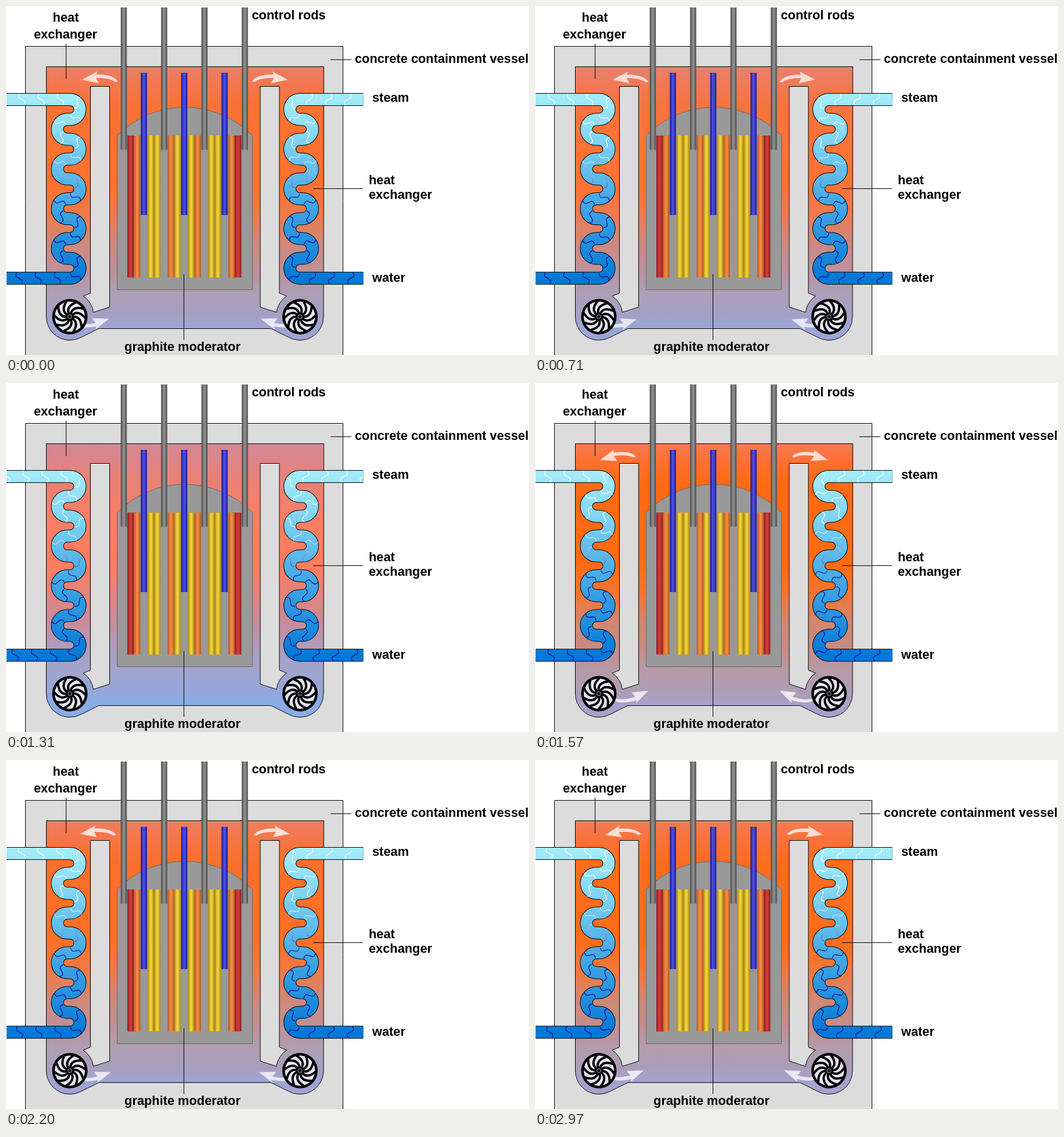
An HTML page with a canvas for the animation above (3000 ms loop, 901 by 601 pixels).

```html
<!DOCTYPE html>
<html lang="en">
<head>
<meta charset="utf-8">
<title>Reactor diagram</title>
<style>
html, body { margin: 0; width: 100%; height: 100%; overflow: hidden; background: #fff; }
canvas { display: block; }
</style>
</head>
<body>
<canvas id="stage" width="901" height="601"></canvas>
<script>
const c = document.getElementById('stage').getContext('2d');
const LOOP = 3000, CYCLE = 727, MIRROR = 616.5;
const CONCRETE = '#dcdcdc';

// Coolant colours as [y, cool, hot]
const COOLANT = [
  [105, 0xcf8b9a, 0xf57a52], [135, 0xda8794, 0xff7030], [175, 0xe88480, 0xff6a12],
  [250, 0xff806c, 0xff6a12], [310, 0xff7f68, 0xff6a12], [360, 0xe28585, 0xf47530],
  [410, 0xc88ca0, 0xd2866c], [460, 0xa89fc8, 0xc68c88], [495, 0x9da6d2, 0xb59ba8],
  [530, 0x92a9de, 0xae9cb4], [552, 0x86aee9, 0xa9a1cb], [576, 0x86aee9, 0xa9a1cb]
];

function mix(a, b, k) {
  const part = n => Math.round((a >> n & 255) * (1 - k) + (b >> n & 255) * k);
  return `rgb(${part(16)},${part(8)},${part(0)})`;
}

function gradient(x0, y0, x1, y1, stops) {
  const g = c.createLinearGradient(x0, y0, x1, y1);
  stops.forEach(([p, color]) => g.addColorStop(p, color));
  return g;
}

function paint(path, fill, line = '#000') {
  c.fillStyle = fill;
  c.fill(path);
  c.strokeStyle = line;
  c.lineWidth = 1;
  c.stroke(path);
}

function place(x, y, angle, draw) {
  c.save();
  c.translate(x, y);
  c.rotate(angle);
  draw();
  c.restore();
}

// Pipe coil
const ROW = 34.2, BEND = ROW / 2, TOP = 161, RIGHT = 110.4, LEFT = 105.6;
const ARC = Math.PI * BEND, SEGMENT = ARC + RIGHT - LEFT;
const coil = new Path2D();
coil.moveTo(1, TOP);
for (let i = 0; i < 9; i++) {
  const y = TOP + BEND + i * ROW;
  if (i % 2) coil.arc(LEFT, y, BEND, -Math.PI / 2, Math.PI / 2, true);
  else coil.arc(RIGHT, y, BEND, -Math.PI / 2, Math.PI / 2);
}
coil.lineTo(1, TOP + 9 * ROW);
const pipeFill = gradient(0, 155, 0, 470, [[0, '#a3ecfa'], [.2, '#87d9f4'], [.5, '#52b2e8'], [1, '#0478d6']]);
const waveInk = gradient(0, 150, 0, 470, [[0, '#fff'], [.28, '#fff'], [.4, '#b4dcf6'], [.47, '#8c86d4'], [.57, '#0808a0'], [1, '#000090']]);

// Position and heading at distance d from the top outlet
function coilPoint(d) {
  const stretch = 1.13;
  d -= RIGHT;
  if (d < 0) return [RIGHT + d * stretch, TOP, 0];
  const n = Math.min(8, Math.floor(d / SEGMENT)), r = d - n * SEGMENT;
  const odd = n % 2, x = odd ? LEFT : RIGHT, side = odd ? -1 : 1;
  const y = TOP + BEND + n * ROW;
  if (r > ARC) return [x - side * (r - ARC) * (n === 8 ? stretch : 1), y + BEND, odd ? 0 : Math.PI];
  const a = r / BEND;
  return [x + side * BEND * Math.sin(a), y - BEND * Math.cos(a), odd ? Math.PI - a : a];
}

function wavePoints(x, y, angle) {
  const cos = Math.cos(angle), sin = Math.sin(angle);
  const at = (u, v) => [x + u * cos - v * sin, y + u * sin + v * cos];
  c.moveTo(...at(-4, -10));
  c.bezierCurveTo(...at(-8, -2), ...at(-3, -2), ...at(0, 0));
  c.bezierCurveTo(...at(3, 2), ...at(8, 2), ...at(4, 10));
}

function drawCoil(s) {
  c.strokeStyle = '#000';
  c.lineWidth = 22;
  c.stroke(coil);
  c.strokeStyle = pipeFill;
  c.lineWidth = 20;
  c.stroke(coil);
  const gap = SEGMENT / 2;
  c.save();
  c.beginPath();
  c.rect(1, 140, 150, 350);
  c.clip();
  c.beginPath();
  for (let k = -5; k < 25; k++) {
    const point = coilPoint(RIGHT + ARC / 2 + gap * (k - (s - 420) / CYCLE));
    if (point[0] > -10) wavePoints(...point);
  }
  c.strokeStyle = waveInk;
  c.lineWidth = 1.2;
  c.stroke();
  c.restore();
}

const arrow = new Path2D('M-2 0Q6 12 36 11L34 16L60 1L31 -4L36 5Q12 6 3 -1Z');

function drawArrows(s) {
  if (s > 600) s -= CYCLE;
  const fade = s < 0 ? (s + 115) / 105 : (560 - s) / 380;
  c.globalAlpha = .76 * Math.max(0, Math.min(1, fade));
  c.fillStyle = '#fff';
  const rad = Math.PI / 180, slide = .163 * s;
  const fall = -2 + .05 * s + .00017 * s * s;
  const rise = 8 + .055 * s + .00007 * s * s;
  place(191 - slide, 130 - .038 * s + .0001 * s * s, Math.PI - fall * rad, () => c.fill(arrow));
  place(118 + slide, 546 - .00008 * s * s, -rise * rad, () => c.fill(arrow));
  c.globalAlpha = 1;
}

function disc(r, color) {
  c.beginPath();
  c.arc(0, 0, r, 0, 7);
  c.fillStyle = color;
  c.fill();
}

function drawFan(s) {
  place(110, 535, -s / CYCLE * 2 * Math.PI, () => {
    disc(30.5, '#000');
    disc(26, '#e6e6f2');
    c.strokeStyle = '#000';
    c.lineWidth = 4;
    for (let i = 0; i < 10; i++) {
      c.rotate(Math.PI / 5);
      c.beginPath();
      c.moveTo(5, 0);
      c.quadraticCurveTo(19, -1, 20, 18);
      c.stroke();
    }
    disc(7, '#000');
    disc(4, '#777');
    disc(2.6, '#111');
  });
}

// Vessel shapes
const vessel = new Path2D('M33.5 69.5H580.5V620H33.5Z');
const chamber = new Path2D();
chamber.moveTo(69.5, 104.5);
chamber.arc(110, 535, 40.5, Math.PI, 1.08, true);
chamber.lineTo(160, 555.5);
chamber.lineTo(MIRROR - 160, 555.5);
chamber.arc(MIRROR - 110, 535, 40.5, Math.PI - 1.08, 0, true);
chamber.lineTo(547.5, 104.5);
chamber.closePath();
const wall = new Path2D('M145.5 138.5H178.5V518.5L150.5 527.5A41 41 0 0 0 133 499.5L145.5 494.5Z');
const core = new Path2D('M191.5 223A164 164 0 0 1 424.5 223V488.5H191.5Z');

function rod(x, y, w, h, dark, light) {
  c.fillStyle = gradient(x, 0, x + w, 0, [[0, dark], [.42, light], [.58, light], [1, dark]]);
  c.fillRect(x, y, w, h);
}

const FUEL = {
  r: ['#8c1a1c', '#cf3c3a'],
  o: ['#b0571c', '#f48a42'],
  y: ['#a8860c', '#f0d23e']
};

function drawCore() {
  paint(core, '#999', '#666');
  ['ro', 'yy', 'oy', 'yo', 'yy', 'or'].forEach((pair, i) => {
    const x = 209 + i * 34.8;
    rod(x, 223, 11.2, 244.5, ...FUEL[pair[0]]);
    rod(x + 11.2, 223, 11.2, 244.5, ...FUEL[pair[1]]);
  });
  for (let i = 0; i < 4; i++) rod(197.7 + i * 69.5, 2.5, 10.5, 245, '#484848', '#8c8c8c');
  for (let i = 0; i < 3; i++) rod(232.3 + i * 69.5, 115, 10.5, 245, '#14148a', '#4c4ce4');
}

const LABELS = [
  ['heat', 103, 27, 'center'], ['exchanger', 102.5, 56, 'center'],
  ['control rods', 423.5, 23], ['concrete containment vessel', 601, 98],
  ['steam', 631, 165], ['heat', 625, 307], ['exchanger', 625, 332],
  ['water', 631, 475], ['graphite moderator', 304, 594, 'center']
];
const leaders = new Path2D('M103.5 65V126M559 92.5H595M529 314.5H615M306.5 462V575');

function drawLabels() {
  c.strokeStyle = c.fillStyle = '#000';
  c.lineWidth = 1;
  c.stroke(leaders);
  c.font = 'bold 21.8px "Liberation Sans", Arial, sans-serif';
  for (const [text, x, y, align = 'left'] of LABELS) {
    c.textAlign = align;
    c.fillText(text, x, y);
  }
}

function drawSide(s) {
  paint(wall, CONCRETE);
  drawArrows(s);
  drawCoil(s);
  drawFan(s);
}

function draw(now) {
  const s = now % LOOP % CYCLE;
  const heat = (1 + Math.cos((s - 140) / CYCLE * 2 * Math.PI)) / 2;
  c.fillStyle = '#fff';
  c.fillRect(0, 0, 901, 601);
  paint(vessel, CONCRETE);
  paint(chamber, gradient(0, 105, 0, 576,
    COOLANT.map(([y, cool, hot]) => [(y - 105) / 471, mix(cool, hot, heat)])));
  drawSide(s);
  c.save();
  c.translate(MIRROR, 0);
  c.scale(-1, 1);
  drawSide(s);
  c.restore();
  drawCore();
  drawLabels();
}

const start = performance.now();
function tick() {
  draw(performance.now() - start);
  requestAnimationFrame(tick);
}
tick();
</script>
</body>
</html>
```
